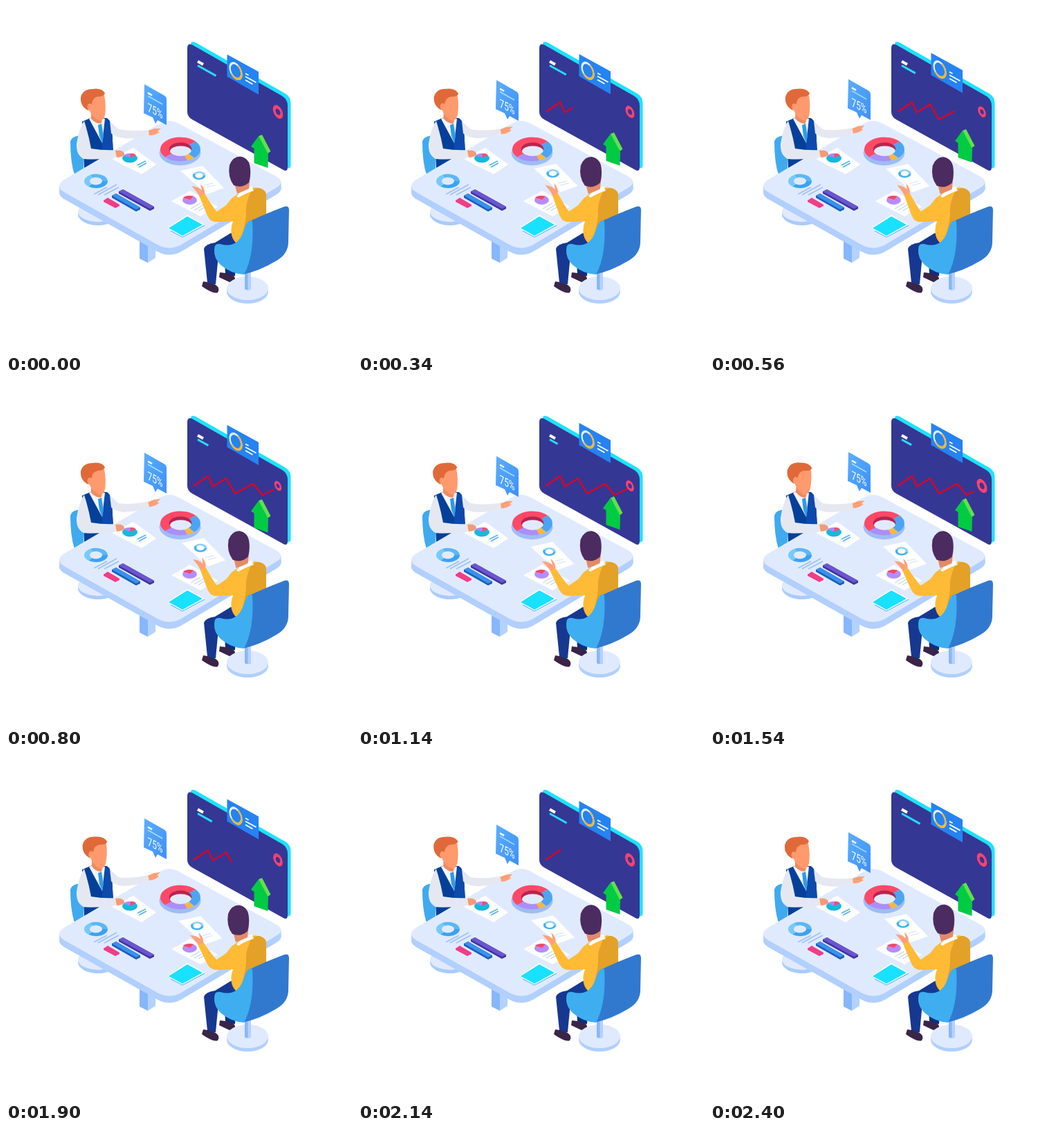
Recreate the animation shown at these times as an HTML page. Size 500 by 500 pixels, loop 2.42 s.

```html
<!DOCTYPE html>
<html lang="en">
<head>
<meta charset="utf-8">
<title>Team meeting</title>
<style>
html, body { margin: 0; width: 100%; height: 100%; overflow: hidden; background: #fff; }
svg { display: block; width: 100vw; height: 100vh; }
</style>
</head>
<body>
<svg viewBox="0 0 500 500" fill="none">
  <defs>
    <linearGradient id="blue" x1="0" y1="0" x2="1" y2="1">
      <stop stop-color="#5aafff"/><stop offset="1" stop-color="#3f90f6"/>
    </linearGradient>
    <path id="screen" d="M262 61Q262 53 269 56L399 130Q407 135 407 144V233Q407 240 401 237L269 164Q262 160 262 153Z"/>
    <path id="top" d="M84 251L222 170Q236 162 250 170L390 246Q405 254 390 263L253 345Q236 354 219 345L84 269Q70 260 84 251Z"/>
  </defs>

  <!-- wall screen -->
  <use href="#screen" x="4.500" y="-3.500" fill="#1de2ff"/>
  <use href="#screen" fill="#353794"/>
  <path d="M277 80L285 84.500" stroke="#fff" stroke-width="4"/>
  <path id="bar" stroke="#25dcff" stroke-width="3"/>
  <path id="graph" d="M271 153L292 139L299 154L318 142L331 164L357 150L371 166L390 157" pathLength="1" stroke="#e3001f" stroke-width="2.200"/>
  <circle id="marker" r="6.700" stroke="#ff416f" stroke-width="4.800"/>
  <g id="arrow">
    <path d="M365 188L370 186L382.500 210L377 214Z" fill="#63df4e"/>
    <path d="M365 188L379 214L378.500 234L358.500 227V206L354 203Z" fill="#00cb43"/>
  </g>
  <g id="card">
    <path d="M319.500 70L365 95V128L319.500 102Z" fill="#2583f2"/>
    <g transform="matrix(.8 .45 0 1 332 94)" stroke-width="3">
      <circle r="10.500" stroke="#e4f0ff"/>
      <circle r="10.500" pathLength="100" transform="rotate(-70)" stroke-dasharray="58 42" stroke="#ffb52e"/>
    </g>
    <path d="M346 97.500L350.500 100M346 102L361.500 110.500M346 107L356.500 113" stroke="#fff" stroke-width="1.800"/>
  </g>

  <!-- left chair, table leg, left man's body -->
  <ellipse cx="133" cy="301" rx="29" ry="16" fill="#a9cbff"/>
  <ellipse cx="133" cy="297" rx="29" ry="15" fill="#e0eaff"/>
  <path d="M193 332H205V371L193 365Z" fill="#86b6fb"/>
  <path d="M205 332H216V364L205 371Z" fill="#b5d1ff"/>
  <path d="M93 196Q95 187 112 187V240L99 244Q93 225 93 196Z" fill="#40aaf0"/>
  <path d="M110 167L124 161L146 162Q153 167 153 178L155 212L113 235Z" fill="#04409a"/>
  <path d="M143 163Q153 166 153 178L155 212L139 216V196Z" fill="#0d4aab"/>
  <path d="M120 163L127 160L143 163L139 198Z" fill="#f3f5fb"/>
  <path d="M133 172L138 170L141 188L139 198L135 188Z" fill="#2f9ce4"/>
  <g id="leftHead">
    <path d="M123 147L141 151L138 169Q132 172 123 163Z" fill="#f08a60"/>
    <path d="M121 135Q129 127 142 129Q145 144 143 158Q140 167 134 165Q125 161 120 150Z" fill="#ff9a6e"/>
    <path d="M119 151Q107 145 108 132Q111 120 125 120Q138 118 143 126Q142 131 132 131Q125 133 124 141Z" fill="#e0693a"/>
    <ellipse cx="121" cy="146" rx="3.500" ry="5" fill="#ff9a6e"/>
  </g>

  <!-- table -->
  <use href="#top" y="10" fill="#b1cfff"/>
  <path d="M77 260H397.500V264H77Z" fill="#b1cfff"/>
  <path d="M77.200 260V270L100 270M397.500 255V265L370 270Z" fill="#b1cfff"/>
  <use href="#top" fill="#e0eaff"/>

  <path d="M153 221L184 205L217 229L196 243Z" fill="#fff"/>
  <ellipse cx="179" cy="220" rx="11" ry="6.500" fill="#18b8dc"/>
  <path d="M179 219L169 216Q176 211 187 214Z" fill="#a78bfa"/>
  <path d="M179 219L180 213Q186 213 188 216Z" fill="#ff4a72"/>
  <path d="M190 230L202 224M192 233L203 227" stroke="#55b1f7" stroke-width="1.700"/>

  <g id="leftDonut" transform="matrix(1 0 0 .6 130 253)"></g>
  <path d="M127 272L146 262M133 273L160 258M142 273L163 262" stroke="#9cc2f7" stroke-width="1.600"/>
  <path d="M141 281L147 277L164 287V289L158 292L141 283Z" fill="#f23c86"/>
  <path d="M153 274L159 271L194 291V294L188 297L153 277Z" fill="#1e5cb8"/>
  <path d="M153 274L159 271L194 291L188 294Z" fill="#3791ef"/>
  <path d="M163 268L169 265L214 290V293L208 296L163 271Z" fill="#43349c"/>
  <path d="M163 268L169 265L214 290L208 293Z" fill="#6a55d4"/>

  <ellipse cx="251.500" cy="212" rx="30" ry="18.500" fill="#9dbdf5"/>
  <ellipse cx="252" cy="207" rx="17" ry="10.500" fill="#b92450"/>
  <ellipse cx="252.500" cy="210" rx="15.500" ry="7.800" fill="#e0eaff"/>
  <g id="donut" transform="matrix(1 0 0 .6 252 207)"></g>

  <path d="M233 321L262 302L287 316L255 335Z" fill="#fff"/>
  <path d="M235 321L262 304L284 316L255 332Z" fill="#18e2ff"/>
  <path d="M238 325L255 334L287 317" stroke="#3ea9ee"/>

  <path d="M239 282L266 267L306 290L281 304Z" fill="#fff"/>
  <ellipse cx="265.500" cy="280.500" rx="10.500" ry="6.500" fill="#b48dfa"/>
  <path d="M266 280L256 277Q260 273 271 275Z" fill="#ff4564"/>
  <path d="M267 293L281 285M272 295L288 286M278 296L292 288" stroke="#c5d5f2" stroke-width="1.300"/>

  <g id="paper">
    <path d="M252 238L284 231L315 263L290 272Z" fill="#fff"/>
    <g transform="matrix(1 0 0 .65 279 245)" id="paperDonut"></g>
    <path d="M287 259L299 256M290 262L302 259" stroke="#dce6f8" stroke-width="1.300"/>
  </g>

  <!-- left man's arms -->
  <path d="M113 166Q106 175 102 199Q101 215 112 221Q135 223 160 218L159 208Q140 209 123 206Q120 190 116 176Z" fill="#e5e8f1"/>
  <path d="M158 209Q168 207 171 213Q172 218 160 219Z" fill="#f59a72"/>
  <path d="M150 166Q155 172 164 179L172 191Q158 190 152 184Z" fill="#e5e8f1"/>
  <g id="leftArm">
    <path d="M163 178Q183 182 208 179L209 187Q187 193 170 191Z" fill="#e5e8f1"/>
    <path d="M206 180L215 177L224 177L219 181L222 182Q216 187 207 187Z" fill="#ff9f76"/>
  </g>
  <g id="bubble">
    <path d="M200 113L228 129Q232 131 232 135V172L219 165L216 170L212 161L199 155Z" fill="url(#blue)"/>
    <path d="M205 125.500L211 129" stroke="#fff" stroke-width="2.500"/>
    <path d="M205 130L226 142" stroke="#a9dcff" stroke-width="1.600"/>
    <text transform="matrix(.7 .35 0 1 204.500 152)" font-family="Roboto, sans-serif" font-size="17" fill="#fff">75%</text>
  </g>

  <!-- right person -->
  <path d="M314 345L334 348L331 390Q323 392 317 386Z" fill="#0f2f80"/>
  <path d="M309 385L318 386L330 391Q334 400 325 400L308 392Z" fill="#392548"/>
  <path d="M325 328L355 340L340 365L307 360L303 402Q297 404 291 400L286 351Q288 344 302 342Z" fill="#163891"/>
  <path d="M285 398L291 399L303 403Q310 408 306 414Q300 417 283 405Z" fill="#392548"/>
  <path d="M326 278Q341 265 360 262Q374 264 376 272V301L356 318L336 345Q323 337 326 318L328 311L303 312Q295 311 293 305L318 288Z" fill="#ffba36"/>
  <path d="M354 268Q362 261 369 264Q376 267 376 273V301L356 312L340 336Q347 312 347 298Q346 285 354 268Z" fill="#e3a128"/>
  <g id="rightArm">
    <path d="M279 274L287 271Q297 288 306 299L304 312Q295 311 291 303Z" fill="#ffba36"/>
    <path d="M280 275L275 268L268 260L277 262L283 266L281 257Q288 264 287 271Z" fill="#ffa177"/>
  </g>
  <path d="M333 275Q343 263 355 261L358 267Q347 270 336 277Z" fill="#fff"/>
  <g id="rightHead">
    <path d="M329 252L353 246L351 264Q343 268 334 271Z" fill="#e48a68"/>
    <path d="M329 259Q320 247 323 230Q328 217 339 217.500Q352 220 353 235Q354 245 351 255Q341 264 329 259Z" fill="#4c2b60"/>
  </g>

  <!-- right chair -->
  <ellipse cx="349" cy="413" rx="30" ry="17" fill="#b0cfff"/>
  <ellipse cx="349" cy="408" rx="30" ry="17" fill="#e0eaff"/>
  <path d="M345 384H354V409Q349 412 345 409Z" fill="#86b6fb"/>
  <path d="M349.500 384H354V409Q352 411 349.500 410.500Z" fill="#b5d1ff"/>
  <path d="M352 311Q378 299 402 290Q409 288 409 295L408 341Q408 358 391 368Q366 383 342 388Z" fill="#3179cf"/>
  <path d="M301 352Q301 342 310 344Q334 351 343 326Q349 306 356 311Q359 360 344 388Q325 387 310 374Q300 364 301 352Z" fill="#3eaef0"/>
</svg>
<script>
const LOOP = 2420;
const TIMES = [0, 340, 800, 1140, 1540, 1900, LOOP];
const el = id => document.getElementById(id);

// Ring made of [start, sweep, colour] pieces, in degrees
function ring(id, radius, width, pieces) {
  el(id).innerHTML = pieces.map(([start, sweep, color]) =>
    `<circle r="${radius}" pathLength="360" transform="rotate(${start})" stroke="${color}"
      stroke-width="${width}" stroke-dasharray="${sweep} ${360 - sweep}"/>`).join('');
}
ring('leftDonut', 13, 8, [[0, 130, '#3ba3f0'], [130, 110, '#75cbfb'], [240, 120, '#5bb7f7']]);
ring('paperDonut', 7.5, 3.6, [[0, 210, '#3fb2f3'], [210, 150, '#8bd2fb']]);
ring('donut', 22.7, 12.6, [[140, 180, '#ff4967'], [320, 85, '#4ba5f2'], [45, 25, '#f8b83d'], [70, 70, '#ad8df8']]);

// Periodic monotone curve through values at TIMES
function curve(values) {
  const n = values.length;
  const at = i => values[(i + n) % n];
  const span = i => TIMES[(i + n) % n + 1] - TIMES[(i + n) % n];
  const rate = i => (at(i + 1) - at(i)) / span(i);
  const slope = i => {
    const a = rate(i - 1), b = rate(i);
    return a * b <= 0 ? 0 : 2 * a * b / (a + b);
  };
  return t => {
    let i = n - 1;
    while (t < TIMES[i]) i--;
    const d = span(i), u = (t - TIMES[i]) / d, v = 1 - u;
    return v * v * (1 + 2 * u) * at(i) + u * u * (3 - 2 * u) * at(i + 1)
      + d * u * v * (v * slope(i) - u * slope(i + 1));
  };
}
const bubbleY = curve([0, -6, -8, -3, -9, -20]);
const markerSize = curve([1, .89, .72, .81, 1.03, .94]);
const leftTilt = curve([0, 2, 0, .3, 4, 3]);
const leftReach = curve([0, -2.5, -5, -2, -2.5, -6]);
const rightReach = curve([0, 2.5, 2, -2.6, -2, -2.8]);
const rightNod = curve([0, -1.2, -1.4, -1.5, -1.5, -2]);

const wave = (t, shift = 0) => Math.cos(2 * Math.PI * (t - shift) / LOOP);
const ease = (t, from, to) => {
  const u = Math.min(1, Math.max(0, (t - from) / (to - from)));
  return u * u * (3 - 2 * u);
};
const pose = (id, transform) => el(id).setAttribute('transform', transform);

function draw(now) {
  const t = now % LOOP;
  const length = 19 + 7.5 * wave(t);
  const shown = ease(t, 0, 870) - ease(t, 1400, 2400);
  const reach = rightReach(t), nod = rightNod(t), size = markerSize(t);

  el('bar').setAttribute('d', `M277 86l${length} ${length * .56}`);
  el('graph').setAttribute('stroke-dasharray', `${shown} 2`);
  el('graph').setAttribute('visibility', shown > .002 ? 'visible' : 'hidden');
  pose('marker', `translate(393 153) scale(${size}) matrix(.8 .45 0 1 0 0)`);
  pose('arrow', `translate(0 ${9 * wave(t) - 9})`);
  pose('card', `translate(0 ${4.4 * wave(t, 130) - 4.2})`);
  pose('bubble', `translate(0 ${bubbleY(t)})`);
  pose('leftHead', `rotate(${leftTilt(t) * 1.35} 133 172)`);
  pose('leftArm', `rotate(${leftReach(t)} 166 186)`);
  pose('paper', `translate(${reach} ${-1.2 * reach})`);
  pose('rightArm', `rotate(${reach * 1.1} 300 308)`);
  pose('rightHead', `translate(${nod} ${-.5 * nod})`);
  requestAnimationFrame(draw);
}
requestAnimationFrame(draw);
</script>
</body>
</html>
```
